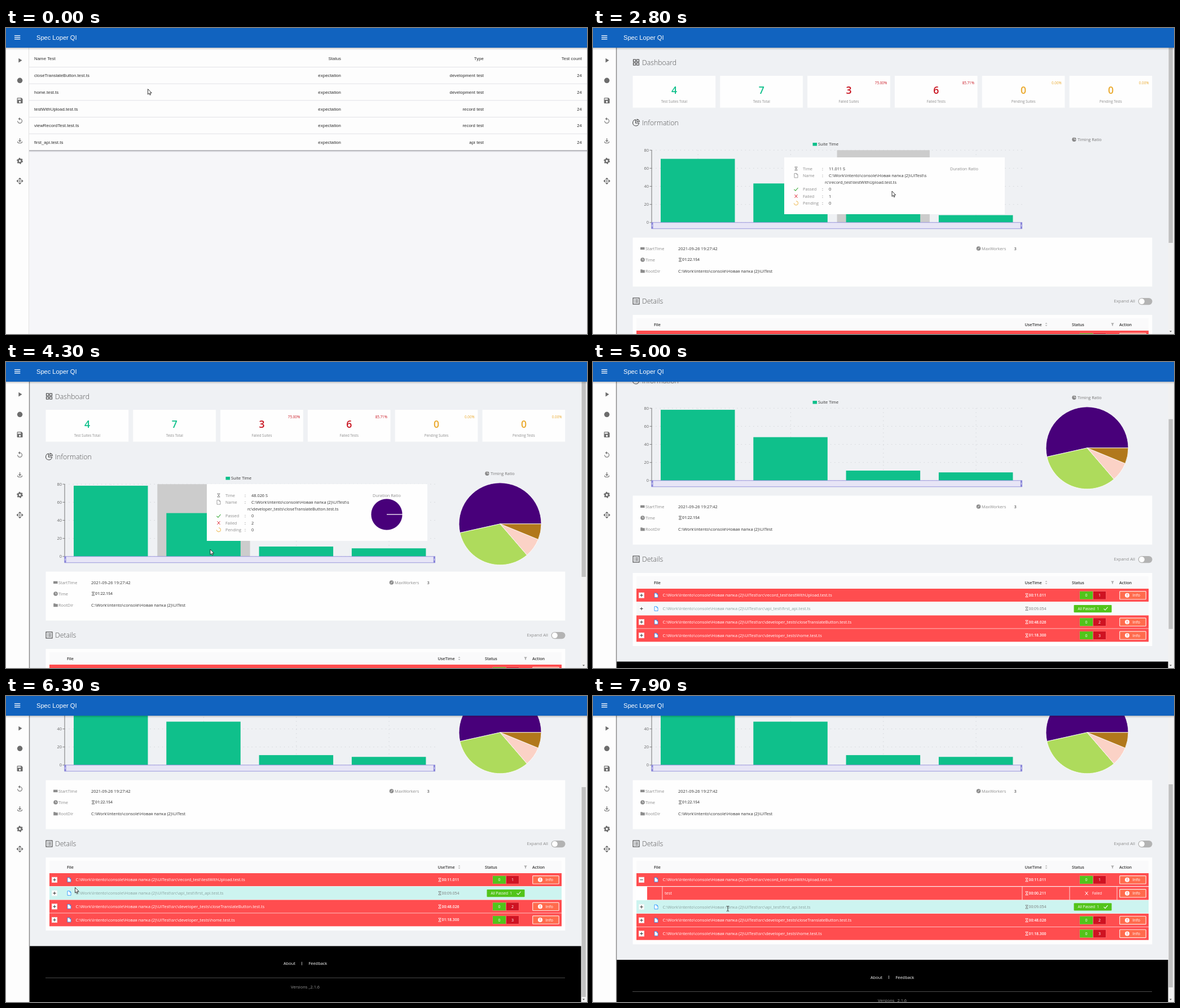
Write an HTML page that moves like this. It is 1030 px wide and 544 px high and loops after 8 s.

```html
<!DOCTYPE html>
<html lang="en">
<head>
<meta charset="utf-8">
<title>Test report</title>
<style>
html, body { margin: 0; height: 100%; overflow: hidden; background: #f6f6f9; }
svg { display: block; width: 100vw; height: 100vh; }
text { white-space: pre; font-family: "Open Sans", "Noto Sans", sans-serif; }
.ui text { font-family: "Liberation Sans", Arial, sans-serif; }
</style>
</head>
<body>
<svg id="stage" viewBox="0 0 1030 544" preserveAspectRatio="none"></svg>
<script>
const LOOP = 8000, STEP = 100;
const GREEN = '#0fc08b', RED = '#ff4d4f', GREY = '#8c8c8c';
const ROOT = 'C:\\Work\\Intento\\console\\Новая папка (2)\\UITest';

// time, x, y
const POINTER = [[0, 251.5, 108.5], [100, 251.5, 108.5], [300, 160, 140], [500, 60, 190], [700, 24, 202],
  [2300, 24, 202], [2500, 190, 235], [2700, 430, 280], [2800, 530, 290], [3100, 545, 296], [3900, 480, 318],
  [4100, 400, 330], [4300, 362, 333], [4600, 340, 350], [5000, 266, 393], [5700, 266, 393],
  [6100, 160, 362], [6500, 85, 319], [7400, 85, 319], [7600, 130, 345], [7900, 239, 378]];
const TOOLTIP = [[2400, 196, 217], [2600, 320, 225], [2700, 355, 230], [2800, 339, 230], [3000, 150, 220],
  [3200, 113, 217], [4000, 113, 217], [4200, 310, 217], [4300, 356, 217], [4500, 360, 217]];
const SCROLL = [[4700, 0], [5000, 135], [5500, 223]];

const SUITES = [
  { secs: 78.3, dir: 'developer_tests', file: 'home.test.ts', passed: 0, failed: 3, color: '#48007a' },
  { secs: 48.026, dir: 'developer_tests', file: 'closeTranslateButton.test.ts', passed: 0, failed: 2, color: '#aedb5c' },
  { secs: 11.011, dir: 'record_test', file: 'testWithUpload.test.ts', passed: 0, failed: 1, color: '#fbd2c6' },
  { secs: 9.054, dir: 'api_test', file: 'first_api.test.ts', passed: 1, failed: 0, color: '#b1781b' }
];
const TABLE_ORDER = [2, 3, 1, 0];

function at(table, t) {
  const i = table.findIndex(row => row[0] > t);
  if (i === 0) return table[0].slice(1);
  if (i < 0) return table[table.length - 1].slice(1);
  const a = table[i - 1], b = table[i], u = (t - a[0]) / (b[0] - a[0]);
  return a.slice(1).map((v, k) => v + (b[k + 1] - v) * u);
}
const progress = (t, start, length) => 1 - (1 - Math.min(1, Math.max(0, (t - start) / length))) ** 2.3;

const rect = (x, y, w, h, fill, extra = '') =>
  `<rect x="${x}" y="${y}" width="${w}" height="${h}" fill="${fill}" ${extra}/>`;
const circle = (x, y, r, fill, extra = '') => `<circle cx="${x}" cy="${y}" r="${r}" fill="${fill}" ${extra}/>`;
const line = (x1, y1, x2, y2, color, extra = '') =>
  `<path d="M${x1} ${y1}L${x2} ${y2}" stroke="${color}" ${extra}/>`;
const shape = (x, y, d, extra) => `<path transform="translate(${x} ${y})" d="${d}" ${extra}/>`;
const stroke = (color, width = .9) => `fill="none" stroke="${color}" stroke-width="${width}"`;
// y is the middle of the line of text
const text = (x, y, str, color = '#333', size = 7.4, extra = '') =>
  `<text x="${x}" y="${y + size * .36}" font-size="${size}" fill="${color}" ${extra}>${str}</text>`;
const END = 'text-anchor="end"', MID = 'text-anchor="middle"', BOLD = 'font-weight="600"';

const hourglass = (x, y, color) => shape(x, y, 'M-2.5-3H2.5M-2.5 3H2.5M-1.7-3C-1.7 0 1.7 0 1.7 3M1.7-3C1.7 0-1.7 0-1.7 3', stroke(color, .8));
const page = (x, y, fill, edge) => shape(x, y, 'M-3-3.8H1L3-1.6V3.8H-3ZM1-3.8V-1.6H3', `fill="${fill}" stroke="${edge}" stroke-width=".8"`);
const check = (x, y, color) => shape(x, y, 'M-3.5 0L-1 2.5 3.5-2.8', stroke(color, 1.1));
const cross = (x, y, color) => shape(x, y, 'M-2.5-3L2.5 3M2.5-3L-2.5 3', stroke(color, 1));

function pie(cx, cy, r, slices, p) {
  if (p <= 0) return '';
  const total = slices.reduce((sum, s) => sum + s.secs, 0);
  const point = a => `${cx + r * Math.cos(a)} ${cy - r * Math.sin(a)}`;
  let angle = 0;
  return slices.map(s => {
    const from = angle;
    const sweep = Math.min(s.secs / total * p * 2 * Math.PI, 6.2831);
    angle += sweep;
    return `<path d="M${cx} ${cy}L${point(from)}A${r} ${r} 0 ${+(sweep > Math.PI)} 0 ${point(angle)}Z" fill="${s.color}" stroke="#fff" stroke-width=".8"/>`;
  }).join('');
}

function header() {
  return rect(0, 35, 1030, 1.5, '#000', 'opacity=".2"') + rect(0, 36.5, 1030, 2, '#000', 'opacity=".07"') +
    rect(0, 0, 1030, 35, '#1163bf') +
    [13.6, 16.7, 19.8].map(y => line(15, y, 25.3, y, '#fff', 'stroke-width="1.3"')).join('') +
    text(54, 16.7, 'Spec Loper QI', '#fff', 11.1);
}

function sidebar(t, dashboard) {
  const ink = '#6d6d6d';
  const icons = [
    '<path d="M8 5v14l11-7z"/>',
    circle(12, 12, 8.5, ink),
    '<path fill-rule="evenodd" d="M17 3H5a2 2 0 0 0-2 2v14a2 2 0 0 0 2 2h14a2 2 0 0 0 2-2V7zM12 19a3 3 0 1 1 0-6 3 3 0 0 1 0 6zM15 9H5V5h10z"/>',
    '<path d="M12 5V1L7 6l5 5V7a6 6 0 1 1-6 6H4a8 8 0 1 0 8-8z"/>',
    `<path d="M12 4V14M8 10.5L12 14.5 16 10.5M5 14V15A4 4 0 0 0 9 19H15A4 4 0 0 0 19 15V14" ${stroke(ink, 2)}/>`,
    circle(12, 12, 5.6, 'none', `stroke="${ink}" stroke-width="4.4"`) +
      circle(12, 12, 8.4, 'none', `stroke="${ink}" stroke-width="3" stroke-dasharray="4.4"`),
    circle(12, 12, 2.4, ink) + [0, 90, 180, 270].map(a =>
      `<path transform="rotate(${a} 12 12)" d="M12 1L7.4 5.6 9.9 8.1 12 6 14.1 8.1 16.6 5.6Z"/>`).join('')
  ];
  return rect(0, 35, 41, 509, '#fdfdfd') +
    (t >= 600 && t < 2400 ? rect(0, 183, 40, 36, '#f0f0f0') : '') +
    (dashboard ? rect(40.8, 35, 1.4, 509, '#858585') : rect(40, 35, 1, 509, '#e2e2e2')) +
    icons.map((d, i) => `<g fill="${ink}" transform="translate(17.9 ${50.9 + i * 35.75}) scale(.555)">${d}</g>`).join('');
}

function testList() {
  const rows = [['Name Test', 'Status', 'Type', 'Test count'],
    ...[['closeTranslateButton', 'development'], ['home', 'development'], ['testWithUpload', 'record'],
      ['viewRecordTest', 'record'], ['first_api', 'api']]
      .map(([name, type]) => [name + '.test.ts', 'expectation', type + ' test', 24])];
  return rect(41, 35, 989, 183, '#fdfdfd') + rows.map((cells, i) => {
    const y = i ? 55 + i * 29.65 : 54;
    return cells.map((c, k) => text([50, 594, 847, 1021][k], y, c, '#2b2b2b', 7.77,
      `letter-spacing=".083" ${k ? END : ''}`)).join('') + rect(41, 69 + i * 29.65, 989, 1, '#e2e2e6');
  }).join('') + rect(41, 217.2, 989, 1.6, '#a9a9ae') + rect(41, 218.8, 989, 1.5, '#dfdfe3');
}

function cards() {
  const red = '#c8131f', amber = '#eaa92c';
  return [['4', 'Test Suites Total', GREEN], ['7', 'Tests Total', GREEN], ['3', 'Failed Suites', red, '75.00%'],
    ['6', 'Failed Tests', red, '85.71%'], ['0', 'Pending Suites', amber, '0.00%'], ['0', 'Pending Tests', amber, '0.00%']]
    .map(([value, label, color, share], i) => {
      const x = 70.5 + i * 154.8;
      return rect(x, 85, 146.7, 56.7, '#fefefe') + text(x + 73.4, 111, value, color, 17.6, MID + ' ' + BOLD) +
        text(x + 73.4, 131, label, GREY, 6.2, MID) + (share ? text(x + 141, 98, share, color, 6.3, END) : '');
    }).join('');
}

function heading(y, label, icon) {
  return `<g transform="translate(76.5 ${y})" ${stroke('#444', 1.1)}>${icon}</g>` +
    text(87, y + .3, label, '#555', 12.3, 'font-weight="300"');
}

function chart(t, hovered) {
  const grow = progress(t, 2200, 950), unit = 128.6 / 80, band = 164.3;
  const dots = 'stroke-dasharray="1.6 5.6" stroke-width=".8"';
  let out = rect(389.5, 204, 7.6, 5.5, GREEN) + text(399, 206, 'Suite Time', '#333');
  for (let v = 0; v <= 80; v += 20) {
    const y = 345.8 - v * unit;
    out += line(104, y, 761, y, '#d0d2d6', dots) + line(100.5, y, 104, y, '#666', 'stroke-width=".8"') + text(99, y, v, '#666', 7.4, END);
  }
  SUITES.forEach((s, i) => {
    const x = 104 + i * band, h = s.secs * unit * grow;
    out += line(x + band / 2, 217, x + band / 2, 346, '#d0d2d6', dots);
    if (i === hovered) out += rect(x, 217.2, band, 128.6, '#ccc');
    out += rect(x + 16, 345.8 - h, 131.5, h, GREEN);
  });
  return out + line(104, 217, 104, 346, '#666', 'stroke-width=".9"') +
    rect(104, 345.8, 656.5, 11, '#e7e5f6', 'stroke="#8884d8" stroke-width=".8"') +
    [103.5, 757.8].map(x => rect(x, 345.8, 3, 11, '#8884d8') + rect(x + 1.1, 349.5, .8, 3.5, '#fff')).join('');
}

function summary() {
  return rect(70.5, 372.7, 920.8, 87, '#fefefe') +
    rect(84, 389.7, 7.5, 4.4, GREY) + text(93, 392, 'StartTime', GREY) + text(151, 392, '2021-09-26 19:27:42') +
    circle(88, 412, 3.8, GREY) + shape(88, 412, 'M0-2.3V.3H1.8', stroke('#fff', .8)) + text(93, 412, 'Time', GREY) +
    hourglass(154.5, 412, '#555') + text(158, 412, '01:22.154', '#555', 6.8, BOLD) +
    shape(88, 432.3, 'M-3.8-3H-.8L.2-2H3.8V3H-3.8Z', `fill="${GREY}"`) + text(93, 432.3, 'RootDir', GREY) + text(151, 432.3, ROOT) +
    circle(683.5, 392, 3.8, GREY) + shape(683.5, 392, 'M-1.5 1.5L1.8-1.8', stroke('#fff', 1)) +
    text(689, 392, 'MaxWorkers', GREY) + text(746.5, 392, '3');
}

const infoButton = y => rect(933.7, y - 7.2, 46.5, 14.4, '#ff6b4d', 'stroke="#ffe3dd" stroke-width="1.2" rx="1"') +
  circle(947, y, 4, '#fff') + text(947, y, '!', RED, 6.5, MID + ' font-weight="700"') + text(956.5, y, 'Info', '#fff');

function clock(secs) {
  const m = Math.floor(secs / 60);
  return `0${m}:${(secs - m * 60).toFixed(3).padStart(6, '0')}`;
}

function useTime(y, secs, color) {
  return hourglass(769, y, color) + text(772.5, y, clock(secs), color, 6.8, color === '#fff' ? BOLD : '');
}

const rowMiddle = (i, open) => 549.8 + i * 23.75 + (open && i ? 24.4 : 0);

function hoveredRow(t) {
  if (t < 5000) return -1;
  const y = at(POINTER, t)[1] + at(SCROLL, t)[0];
  return [0, 1, 2, 3].find(i => Math.abs(rowMiddle(i, t >= 7100) - y) < 11.9);
}

function details(t) {
  const open = t >= 7100, extra = open ? 24.4 : 0, hot = [hoveredRow(t)];
  if (t < 7000) hot.push(hoveredRow(t - 200));
  let out = text(961, 485.6, 'Expand All', GREY, 7.7, END) + rect(966.5, 480, 25, 12.2, '#b3b3b3', 'rx="6.1"') + circle(972.8, 486.1, 5, '#fff') +
    rect(70.5, 510, 920.8, 130 + extra, '#fefefe') + rect(77, 516, 908, 22, '#fafafb') +
    [[108, 'File'], [765.5, 'UseTime'], [849, 'Status'], [933, 'Action']].map(([x, s]) => text(x, 527, s, '#333', 7.2, BOLD)).join('') +
    shape(803.5, 527, 'M-2-1L0-3.3 2-1ZM-2 1L0 3.3 2 1Z', 'fill="#bbb"') + shape(921, 527, 'M-2.8-2.5H2.8L.8 0V2.5H-.8V0Z', 'fill="#aaa"');

  TABLE_ORDER.forEach((id, i) => {
    const s = SUITES[id], y = rowMiddle(i, open), ok = !s.failed, isHot = hot.includes(i);
    const ink = ok ? '#88a19f' : '#fff', opened = open && i === 0;
    out += rect(77, y - 11.8, 908, 23.1, ok ? (isHot ? '#cdf4f0' : '#f7f9fa') : (isHot ? '#f14546' : RED)) +
      rect(81.3, y - 4.7, 9.4, 9.4, '#fff', 'stroke="#eee" stroke-width=".6"') +
      shape(86, y, opened ? 'M-2.7 0H2.7' : 'M-2.7 0H2.7M0-2.7V2.7', stroke('#333', 1)) +
      page(112, y, '#fff', '#1890ff') + text(123.5, y, `${ROOT}\\src\\${s.dir}\\${s.file}`, ink) + useTime(y, s.secs, ok ? '#777' : ink);
    if (ok) {
      out += rect(852.5, y - 6.6, 67, 13.2, '#52c41a', 'rx="1"') + text(859.5, y, 'All Passed  1', '#fff', 6.5) + check(909, y, '#fff');
    } else {
      out += rect(862.8, y - 7.2, 46.6, 14.4, '#ffb1b1') + rect(863, y - 7, 23, 14, '#52c41a') + rect(886.6, y - 7, 22.6, 14, '#cf1322') +
        text(874.5, y, s.passed, '#fff', 7, MID) + text(898, y, s.failed, '#fff', 7, MID) + infoButton(y);
    }
  });

  if (open) {
    const y = 573.8;
    out += rect(77, y - 12, 908, 24, '#fff') + rect(96, y - 11.6, 889, 23.2, RED) +
      [122.5, 760.5, 844.5, 928.5].map(x => rect(x, y - 12, .9, 24, '#ffe4e4')).join('') +
      text(127, y, 'test', '#fff') + useTime(y, .211, '#fff') + cross(875, y, '#fff') + text(885, y, 'Failed', '#fff', 6.2) + infoButton(y);
  }
  const f = 667.6 + extra;
  return out + rect(42, f, 978, 130, '#000') + text(492, f + 31, 'About', '#fff') + rect(524.2, f + 28, .8, 6, '#ddd') +
    text(536.5, f + 31, 'Feedback', '#fff') + rect(70, f + 56, 921, .9, '#555') + text(530.5, f + 72.3, 'Versions _2.1.6', '#999', 7.4, MID);
}

function tooltip(t, id, p) {
  const s = SUITES[id], [x, y] = at(TOOLTIP, t);
  const path = `${ROOT}\\src\\${s.dir}\\${s.file}`, cut = ROOT.length + 2;
  const rows = [['Time', s.secs.toFixed(3) + ' S', 20], ['Name', path.slice(0, cut), 32.3],
    ['Passed', s.passed, 56.8], ['Failed', s.failed, 69], ['Pending', 0, 81.3]];
  return `<g transform="translate(${x} ${y})">` + rect(0, 0, 391, 101, '#fefefe') +
    rows.map(([label, value, ly]) => text(33, ly, label, GREY) + text(67, ly, ':', '#444') + text(79, ly, value)).join('') +
    text(72, 44.5, path.slice(cut)) +
    hourglass(21, 20, '#777') + page(21, 32.3, 'none', GREY) + check(21, 56.8, '#2fa52f') + cross(21, 69, '#e0343f') +
    shape(21, 81.3, 'M0-3.6A3.6 3.6 0 1 1-3.6 0', stroke('#efb64a', 1)) +
    text(294, 20, 'Duration Ratio', GREY) + pie(319, 54, 28, [SUITES[0]], p) + '</g>';
}

function dashboard(t) {
  const [px] = at(POINTER, t), scroll = at(SCROLL, t)[0];
  const inChart = t >= 2400 && t < 4600 && px > 104 && px < 761;
  const hovered = inChart ? Math.floor((px - 104) / 164.3) : -1;
  const p = progress(t, 2850, 1450);
  const squares = [[-5, -5], [1, -5], [-5, 1], [1, 1]].map(([x, y]) => rect(x, y, 4, 4, 'none')).join('');
  const thumb = t >= 7100 ? [157, 361] : [9 + scroll * .686, 373];
  return rect(41, 35, 989, 509, '#eff1f4') + `<g transform="translate(0 ${-scroll})">` +
    heading(61, 'Dashboard', squares) + cards() +
    heading(168, 'Information', '<path d="M-1-5A5.5 5.5 0 1 0 5 1H-1ZM1.5-5.7V-1.5H5.7A5 5 0 0 0 1.5-5.7Z"/>') +
    chart(t, hovered) + circle(853, 198.3, 3.7, '#888') + shape(853, 198.3, 'M0-4V0H4', stroke('#eee', .8)) +
    text(859, 198, 'Timing Ratio', '#777') + pie(876, 287.8, 73, SUITES, p) + summary() +
    heading(485.5, 'Details', rect(-5.5, -5.5, 11, 11, 'none') + '<path d="M-3.3-2.5H-2M-3.3 0H-2M-3.3 2.5H-2M-1-2.5H3.3M-1 0H3.3M-1 2.5H3.3"/>') +
    details(t) + (inChart ? tooltip(t, hovered, p) : '') + '</g>' +
    rect(1019.5, 35, 10.5, 509, '#f1f1f1') + rect(1020.5, thumb[0], 7.5, thumb[1], '#c1c1c1') +
    shape(1024, 539.5, 'M-2-1H2L0 1.2Z', 'fill="#555"');
}

function pointer(t) {
  const [x, y] = at(POINTER, t);
  if (t >= 4700 && t < 5400) return '';
  if ((t >= 5400 && t < 6300) || t >= 7700)
    return shape(x, y, 'M-2.2-4.5Q0-4.5 0-3.5Q0-4.5 2.2-4.5M0-3.5V3.5M-2.2 4.5Q0 4.5 0 3.5Q0 4.5 2.2 4.5', stroke('#333', 1));
  const hand = t >= 700 && t < 2400;
  return shape(x, y, hand ? 'M-1 0H1V4L6 5.5 5.5 11H0L-4 6.5-3 5.7-1 7Z' : 'M0 0V9.5L2.2 7.5 3.6 10.7 5.1 10 3.7 6.9H6.7Z',
    'fill="#fff" stroke="#222" stroke-width=".9" stroke-linejoin="round"');
}

function scene(t) {
  const loaded = t >= 2200;
  return rect(0, 0, 1030, 544, '#f6f6f9') + (loaded ? dashboard(t) : '') +
    '<g class="ui">' + (t < 1200 ? testList() : '') + sidebar(t, loaded) + header() + '</g>' + pointer(t);
}

const stage = document.getElementById('stage');
let shown = -1;
function tick(now) {
  const t = Math.floor(now % LOOP / STEP) * STEP;
  if (t !== shown) stage.innerHTML = scene(shown = t);
  requestAnimationFrame(tick);
}
tick(performance.now());
</script>
</body>
</html>
```
